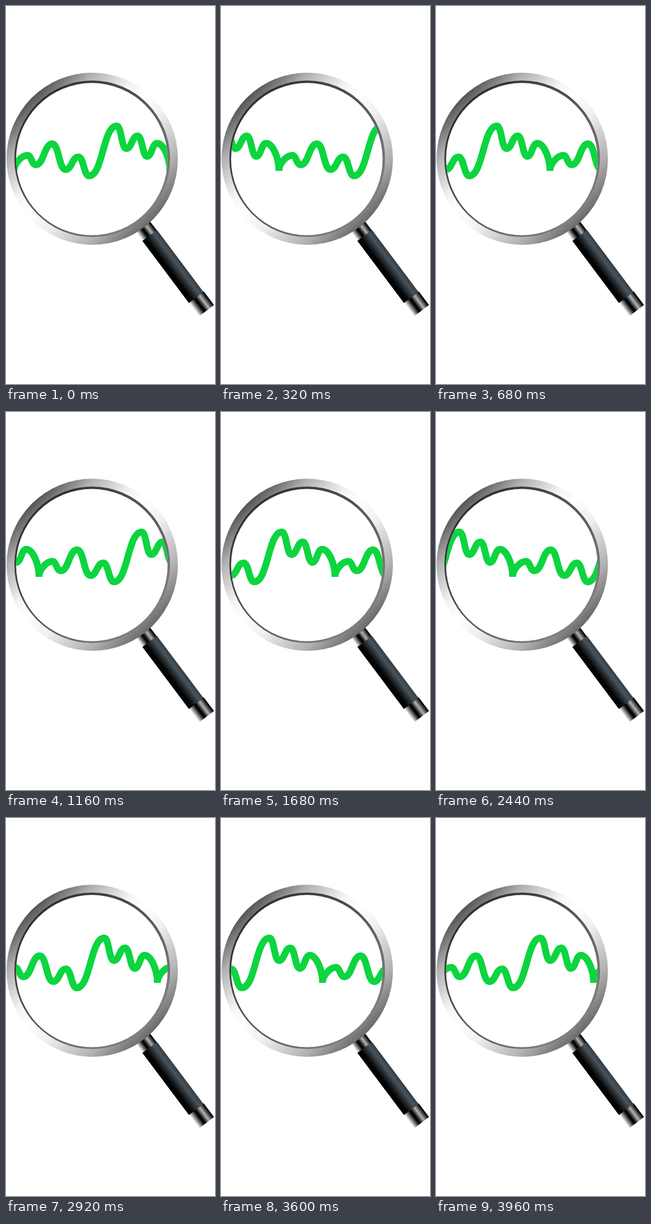
An HTML page that plays this animation: 400 px wide and 720 px high, repeating every 4000 ms.

```html
<!DOCTYPE html>
<html lang="en">
<head>
<meta charset="utf-8">
<title>Magnified chart</title>
<style>
  html, body { margin: 0; width: 100%; height: 100%; overflow: hidden; background: #fff; }
  svg { display: block; width: 100%; height: 100%; }
</style>
</head>
<body>
<svg viewBox="0 0 400 720">
  <defs>
    <linearGradient id="rim" x1="0.147" y1="0.147" x2="0.853" y2="0.853">
      <stop offset="0" stop-color="#555"/>
      <stop offset=".15" stop-color="#b0b0b0"/>
      <stop offset=".35" stop-color="#f4f4f4"/>
      <stop offset=".45" stop-color="#fff"/>
      <stop offset=".6" stop-color="#f0f0f0"/>
      <stop offset=".84" stop-color="#b0b0b0"/>
      <stop offset="1" stop-color="#6a6a6a"/>
    </linearGradient>
    <linearGradient id="bevel" x1="0.147" y1="0.147" x2="0.853" y2="0.853">
      <stop offset="0" stop-color="#303030"/>
      <stop offset="1" stop-color="#808080"/>
    </linearGradient>
    <linearGradient id="metal">
      <stop offset="0" stop-color="#fff"/>
      <stop offset=".36" stop-color="#000"/>
      <stop offset=".45" stop-color="#0a0a0a"/>
      <stop offset=".68" stop-color="#b4b4b4"/>
      <stop offset=".96" stop-color="#000"/>
      <stop offset="1" stop-color="#111"/>
    </linearGradient>
    <linearGradient id="grip">
      <stop offset="0" stop-color="#000"/>
      <stop offset=".25" stop-color="#030404"/>
      <stop offset=".74" stop-color="#49545d"/>
      <stop offset="1" stop-color="#343c42"/>
    </linearGradient>
    <clipPath id="lens"><circle cx="164.3" cy="291.6" r="145"/></clipPath>
  </defs>

  <g transform="translate(275 437) rotate(-37)">
    <rect x="-16.7" y="-30" width="33.4" height="31" fill="url(#metal)"/>
    <rect x="-17" y="147" width="35.5" height="33" fill="url(#metal)"/>
    <rect x="-17.5" width="35" height="148" fill="url(#grip)"/>
  </g>

  <circle cx="165" cy="291" r="164" fill="url(#rim)"/>
  <circle cx="165" cy="291" r="149" fill="url(#bevel)"/>
  <circle cx="164.3" cy="291.6" r="145" fill="#fff"/>

  <g clip-path="url(#lens)">
    <g id="wave" fill="none" stroke="#0cd53f" stroke-width="13">
      <path/>
      <path transform="translate(-298)"/>
    </g>
  </g>
</svg>
<script>
  const PERIOD = 298, CYCLE = 1000, STEP = 40;

  // Peaks and valleys of one chart section
  const turns = [
    [41, 284.5], [57, 302.5], [88.5, 262.5], [114, 311.5], [138.5, 287.5], [159, 323.5],
    [212, 228.5], [230, 271.5], [252, 247.5], [270, 286.5], [289, 261.5]
  ];

  let d = "M15.5 314C15.5 300 30 284.5 41 284.5";
  turns.slice(1).forEach(([x, y], i) => {
    const [px, py] = turns[i], reach = (x - px) * 0.5;
    d += `C${px + reach} ${py} ${x - reach} ${y} ${x} ${y}`;
  });
  d += "C302 261.5 313.5 290 313.5 314";

  const wave = document.getElementById("wave");
  wave.querySelectorAll("path").forEach(path => path.setAttribute("d", d));

  function draw(now) {
    const time = Math.floor(now / STEP) * STEP % CYCLE;
    wave.setAttribute("transform", `translate(${PERIOD * time / CYCLE})`);
    requestAnimationFrame(draw);
  }
  draw(performance.now());
</script>
</body>
</html>
```
